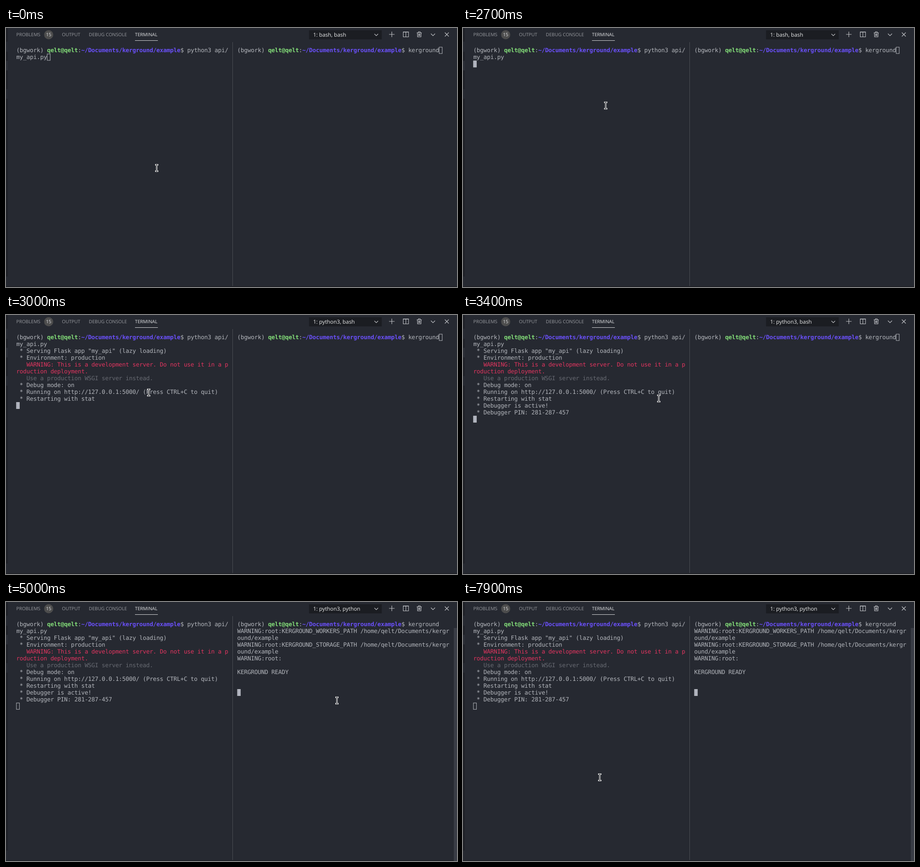
Animation of 986x568 px, one loop 8000 ms. Source, as an HTML page:

```html
<!DOCTYPE html>
<html lang="en">
<head>
<meta charset="utf-8">
<title>Terminal</title>
<style>
  html, body { margin: 0; width: 100%; height: 100%; overflow: hidden; background: #262931; }
  svg { display: block; width: 100%; height: 100%; }
  text { white-space: pre; text-rendering: geometricPrecision; }
  .term text { font: 12.8px "DejaVu Sans Mono", monospace; letter-spacing: -0.23px; fill: #b2b5bb; }
  .term .user { font-weight: bold; fill: #82dc78; }
  .term .path { font-weight: bold; fill: #6a50fa; }
  .term .red { fill: #e0355f; }
  .term .dim { fill: #676a72; }
  .tab { font: 10.2px "Open Sans", sans-serif; fill: #989a9f; }
  .on { fill: #e4e5e7; }
  .pick { font: 11.8px "Open Sans", sans-serif; fill: #eceded; }
  .icon { fill: none; stroke: #c3c5c9; stroke-width: 1.1; }
</style>
</head>
<body>
<svg viewBox="0 0 986 568" preserveAspectRatio="none">
  <rect width="986" height="568" fill="#262931"/>
  <g fill="#1f2127">
    <rect width="4" height="30"/>
    <rect y="52" width="4" height="20"/>
    <rect y="93" width="4" height="41"/>
    <rect y="155" width="4" height="390"/>
    <rect y="566" width="986" height="2"/>
  </g>
  <rect y="72" width="4" height="21" fill="#2b2e36"/>
  <rect x="495" y="31" width="1" height="535" fill="#4a4d54"/>
  <rect id="slider" x="979" y="57" width="7" height="511" fill="#393c45"/>

  <text class="tab" x="22.5" y="17.8">PROBLEMS</text>
  <circle cx="93.3" cy="14.8" r="10" fill="#4d4d4d"/>
  <text class="tab on" x="93.3" y="18.4" text-anchor="middle">15</text>
  <text class="tab" x="122.3" y="17.8">OUTPUT</text>
  <text class="tab" x="181" y="17.8">DEBUG CONSOLE</text>
  <text class="tab on" x="282" y="17.8">TERMINAL</text>
  <rect x="282" y="27" width="50" height="1" fill="#d5d6d8"/>

  <rect x="662.5" y="5" width="159" height="20" fill="#1b1d22"/>
  <text class="pick" id="pick" x="671.5" y="18.8"></text>
  <g class="icon">
    <path d="M805.5 13l4 4 4-4"/>
    <path d="M837.5 14h12M843.5 8v12"/>
    <path d="M868.5 8.5h11.5v11h-11.5zM874.2 8.5v11M868.5 9h11.5"/>
    <path d="M898 10.5h11M901.5 10.3v-2h4v2M899.3 10.5l.5 9h7.4l.5-9M901.9 12.5v5M903.5 12.5v5M905.1 12.5v5"/>
    <path d="M929 12.5l4.5 4.5 4.5-4.5"/>
    <path d="M959.5 10l8.5 8.5M968 10l-8.5 8.5"/>
  </g>

  <g class="term" id="left"></g>
  <g class="term" id="right"></g>
  <g id="mouse" fill="none" stroke-linecap="square">
    <path d="M-2-7H2M0-7V7M-2 7H2" stroke="#f2f2f2" stroke-width="3"/>
    <path d="M-1.5-7H1.5M0-7V7M-1.5 7H1.5" stroke="#16181c" stroke-width="1"/>
  </g>
</svg>
<script>
const LOOP = 8000, CELL = 7.476, ROW = 14.95, TOP = 41.5;
const $ = id => document.getElementById(id);

function add(parent, tag, attrs, content = "") {
  const el = document.createElementNS("http://www.w3.org/2000/svg", tag);
  for (const k in attrs) el.setAttribute(k, attrs[k]);
  el.textContent = content;
  parent.append(el);
  return el;
}

// Each line: [time shown, row, text, class, column]
function pane(id, x, command, lines) {
  const g = $(id);
  const all = [
    [0, 0, "(bgwork) "],
    [0, 0, "qelt@qelt", "user", 9],
    [0, 0, ":", "", 18],
    [0, 0, "~/Documents/kerground/example", "path", 19],
    [0, 0, "$ " + command, "", 48],
    ...lines
  ].map(([at, row, str, cls = "", col = 0]) => ({
    at,
    el: add(g, "text", { x: x + col * CELL, y: TOP + 11.6 + row * ROW, class: cls }, str)
  }));
  const caret = add(g, "rect", { width: 6.6, height: 14, stroke: "#b5b8be" });
  return (t, [, col, row, solid]) => {
    for (const l of all) l.el.style.display = t >= l.at ? "" : "none";
    caret.setAttribute("x", x + 0.4 + col * CELL);
    caret.setAttribute("y", TOP + 0.5 + row * ROW);
    caret.setAttribute("fill", solid ? "#b0b3be" : "none");
  };
}

const drawLeft = pane("left", 22.4, "python3 api/", [
  [0, 1, "my_api.py"],
  [2900, 2, ' * Serving Flask app "my_api" (lazy loading)'],
  [2900, 3, " * Environment: production"],
  [2900, 4, "   WARNING: This is a development server. Do not use it in a p", "red"],
  [2900, 5, "roduction deployment.", "red"],
  [2900, 6, "   Use a production WSGI server instead.", "dim"],
  [2900, 7, " * Debug mode: on"],
  [3000, 8, " * Running on http://127.0.0.1:5000/ (Press CTRL+C to quit)"],
  [3000, 9, " * Restarting with stat"],
  [3400, 10, " * Debugger is active!"],
  [3400, 11, " * Debugger PIN: 281-287-457"]
]);

const drawRight = pane("right", 505.6, "kerground", [
  [5000, 1, "WARNING:root:KERGROUND_WORKERS_PATH /home/qelt/Documents/kergr"],
  [5000, 2, "ound/example"],
  [5000, 3, "WARNING:root:KERGROUND_STORAGE_PATH /home/qelt/Documents/kergr"],
  [5000, 4, "ound/example"],
  [5000, 5, "WARNING:root:"],
  [5000, 7, "KERGROUND READY"]
]);

// Stepped tracks; the first value is the start time
const leftCaret = [
  [0, 9, 1, false], [1800, 9, 1, true], [2700, 0, 2, true], [2900, 0, 8, true],
  [3000, 0, 10, true], [3400, 0, 12, true], [3700, 0, 12, false]
];
const rightCaret = [[0, 59, 0, false], [3700, 59, 0, true], [5000, 0, 10, true]];
const pick = [[0, "1: bash, bash"], [2900, "1: python3, bash"], [5000, "1: python3, python"]];
const mouse = [
  [0, 329.5, 307], [1600, 312, 170], [3400, 428, 183], [3500, 575, 197], [3600, 690, 211],
  [3700, 723.5, 216], [6400, 640, 252], [6500, 445, 355], [6600, 350, 402], [7900, 299, 384.5]
];
const now = (track, t) => track.findLast(s => t >= s[0]);

function draw(t) {
  drawLeft(t, now(leftCaret, t));
  drawRight(t, now(rightCaret, t));
  $("pick").textContent = now(pick, t)[1];
  const [, x, y] = now(mouse, t);
  $("mouse").setAttribute("transform", `translate(${x} ${y})`);
  $("slider").style.display = t >= 3500 ? "" : "none";
}

const start = performance.now();
function tick() {
  draw((performance.now() - start) % LOOP);
  requestAnimationFrame(tick);
}
tick();
</script>
</body>
</html>
```
